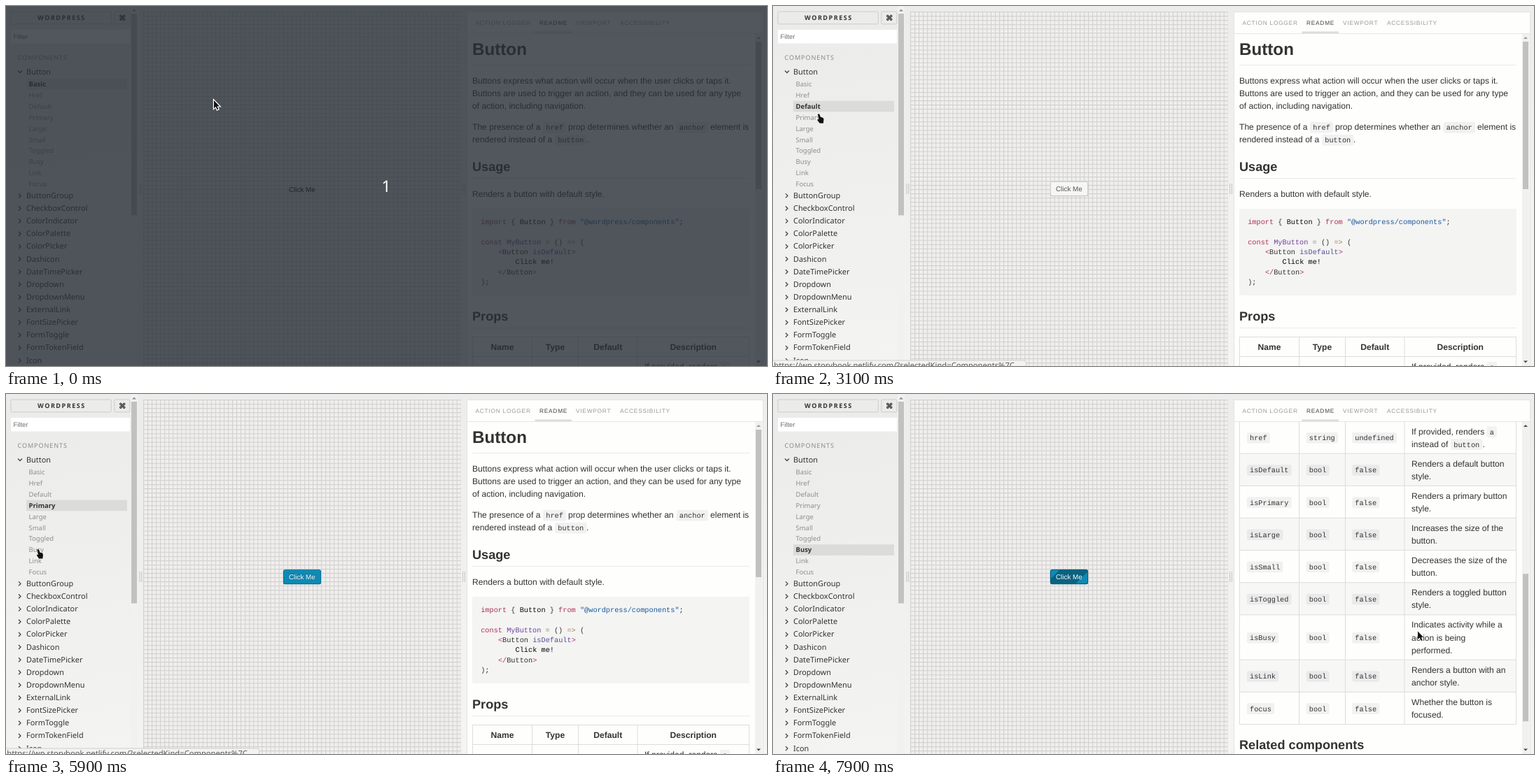
An HTML page that plays this animation: 1087 by 515 pixels, repeating every 8000 ms.

```html
<!DOCTYPE html>
<html lang="en">
<head>
<meta charset="utf-8">
<title>Component storybook</title>
<style>
html, body { margin: 0; width: 100%; height: 100%; overflow: hidden; background: #eeeeed; }
svg { display: block; width: 1087px; height: 515px; }
text { white-space: pre; text-rendering: geometricPrecision; }
.ui { font-family: "Noto Sans", "Open Sans", sans-serif; }
.sans { font-family: "Liberation Sans", Arial, sans-serif; }
.mono { font-family: "Liberation Mono", monospace; }
</style>
</head>
<body>
<svg id="stage" viewBox="0 0 1087 515">
  <defs>
    <linearGradient id="page" x2=".35" y2="1">
      <stop stop-color="#ebebea"/><stop offset="1" stop-color="#f4f4f3"/>
    </linearGradient>
    <pattern id="grid" x="196" y="8" width="6.05" height="6.05" patternUnits="userSpaceOnUse">
      <path d="M0 .5H6.05M.5 0V6.05" stroke="#000" stroke-opacity=".13"/>
    </pattern>
    <clipPath id="readmeClip"><rect x="659" y="40" width="411" height="475"/></clipPath>
    <clipPath id="buttonClip"><rect x="396.5" y="251.5" width="53" height="20" rx="2"/></clipPath>
  </defs>
</svg>
<script>
const LOOP = 8000, STEP = 100;
const stage = document.getElementById('stage');
const INK = '#333';

function add(parent, tag, attrs = {}, text) {
  const el = document.createElementNS('http://www.w3.org/2000/svg', tag);
  for (const k in attrs) el.setAttribute(k, attrs[k]);
  if (text !== undefined) el.textContent = text;
  parent.append(el);
  return el;
}
const group = (parent, attrs) => add(parent, 'g', attrs);
const rect = (parent, x, y, width, height, fill, more) =>
  add(parent, 'rect', { x, y, width, height, fill, ...more });
const line = (parent, d, stroke, more) =>
  add(parent, 'path', { d, stroke, fill: 'none', ...more });
const label = (parent, cls, size, x, y, str, fill = INK, more) =>
  add(parent, 'text', { class: cls, 'font-size': size, x, y, fill, ...more }, str);
const show = (el, on) => el.setAttribute('visibility', on ? 'visible' : 'hidden');
const bold = { 'font-weight': 700 };

// Sidebar
rect(stage, 0, 0, 1087, 515, 'url(#page)');
const side = group(stage);
const frame = { stroke: '#c4c4c3', 'stroke-width': 0.8, rx: 1.5 };
rect(side, 6.9, 8, 143.4, 17.8, 'none', frame);
rect(side, 154.9, 8, 22, 17.8, 'none', frame);
label(side, 'ui', 9.07, 45, 20.3, 'WORDPRESS', INK, { ...bold, 'letter-spacing': 1.5 });
label(side, 'ui', 10.5, 166, 20.8, '⌘', INK, { ...bold, 'text-anchor': 'middle' });
rect(side, 7, 34, 170, 19.5, '#fff');
label(side, 'sans', 9.4, 10.5, 47, 'Filter', '#6d6d6d');
label(side, 'ui', 9.1, 16.5, 77, 'COMPONENTS', '#8c8c8c', { 'letter-spacing': 0.9 });

line(side, 'M17 92.5l3 3 3-3', '#444', { 'stroke-width': 1.3 });
label(side, 'ui', 10.9, 29, 97.6, 'Button');
const marker = rect(side, 29, 104, 144, 15.6, '#dbdbda');
const stories = 'Basic Href Default Primary Large Small Toggled Busy Link Focus'.split(' ')
  .map((name, i) => label(side, 'ui', 9.5, 32.5, 115.1 + i * 15.89, name));
('ButtonGroup CheckboxControl ColorIndicator ColorPalette ColorPicker Dashicon DateTimePicker ' +
 'Dropdown DropdownMenu ExternalLink FontSizePicker FormToggle FormTokenField Icon')
  .split(' ').forEach((name, i) => {
    const y = 271 + i * 18.13;
    line(side, `M18 ${y - 2.6}l3 3-3 3`, '#444', { 'stroke-width': 1.3 });
    label(side, 'ui', 10.9, 29, y + 3.9, name);
  });
rect(side, 178, 0, 10, 515, '#f1f1f0');
rect(side, 179, 11, 8, 288.5, '#c1c1c1');
add(side, 'path', { d: 'M180 7.5l3-3 3 3z', fill: '#8a8a8a' });

// Preview
rect(stage, 196, 8, 454, 507, '#f0efee');
rect(stage, 196, 8, 454, 507, 'url(#grid)');
line(stage, 'M191 254v15M193.8 254v15M652.6 254v15M655.4 254v15', '#c4c4c4');

function clickMe(parent, y, fill, more) {
  label(parent, 'sans', 9.83, 404, y, 'Click Me', fill, more);
}
const BLUE = '#0f8ab3', NAVY = '#005f87', BUSY = '#0b627f';
function buttonBox(parent, fill, edge, shade) {
  rect(parent, 396, 252, 54, 20.3, shade, { rx: 2.5 });
  rect(parent, 396.4, 251.4, 53.2, 20, fill, { stroke: edge, 'stroke-width': 0.8, rx: 2.3 });
}
const buttons = {};
buttons.basic = group(stage);
clickMe(buttons.basic, 265.6, '#000');
buttons.plain = group(stage);
buttonBox(buttons.plain, '#f6f6f5', '#c9c9c9', '#bdbdbd');
clickMe(buttons.plain, 265, '#555');
buttons.primary = group(stage);
buttonBox(buttons.primary, BLUE, '#08709a', NAVY);
clickMe(buttons.primary, 265, '#fff', { style: 'text-shadow:0 -1px 1px ' + NAVY });

// Slanted dark bands that slide left through the busy button
const TILE = 75.6, BAND_SPEED = 0.0605;
buttons.busy = group(stage);
buttonBox(buttons.busy, BLUE, NAVY, NAVY);
const bands = group(group(buttons.busy, { 'clip-path': 'url(#buttonClip)' }));
for (const x of [-TILE, 0])
  add(bands, 'path', { d: `M${x + 27} 251h42.5l-21 21h-42.5z`, fill: BUSY });
rect(buttons.busy, 396.4, 251.4, 53.2, 20, 'none', { stroke: NAVY, 'stroke-width': 0.8, rx: 2.3 });
clickMe(buttons.busy, 265, '#fff', { style: 'text-shadow:0 -1px 1px ' + NAVY });

// Readme panel
rect(stage, 658.5, 8.5, 423, 520, '#fefefd', { stroke: '#e3e3e2' });
line(stage, 'M659 39.5H1081', '#e6e6e5');
rect(stage, 755.5, 36.5, 52.5, 2.5, '#dcdcdb');
[['ACTION LOGGER', 670.5], ['README', 762], ['VIEWPORT', 814], ['ACCESSIBILITY', 877]].forEach(([name, x], i) =>
  label(stage, 'sans', 8.32, x, 26.5, name, i === 1 ? '#444' : '#999', { 'letter-spacing': 0.76 }));

const panel = group(stage);
const doc = group(group(panel, { 'clip-path': 'url(#readmeClip)' }));
const CODE = 10.28, CHAR = 6.17, BODY = 12.1;

const para = (x, y, str, more) => label(doc, 'sans', BODY, x, y, str, INK, more);
function chip(x, y, str) {
  rect(doc, x - 4.1, y - 11.3, str.length * CHAR + 8.2, 15.6, '#1b1f23', { 'fill-opacity': 0.055, rx: 2.3 });
  label(doc, 'mono', CODE, x, y, str);
}
function heading(y, str, size = 18.15, rule = y + 10.5) {
  label(doc, 'sans', size, 666, y, str, INK, bold);
  line(doc, `M666 ${rule}H1062`, '#e8eaec');
}

heading(70.3, 'Button', 24.2, 84.5);
para(666, 110.6, 'Buttons express what action will occur when the user clicks or taps it.');
para(666, 128.7, 'Buttons are used to trigger an action, and they can be used for any type');
para(666, 146.9, 'of action, including navigation.');
para(666, 177.2, 'The presence of a');
chip(771.3, 177.2, 'href');
para(803, 177.2, 'prop determines whether an');
chip(961.8, 177.2, 'anchor');
para(1006, 177.2, 'element is');
para(666, 195.3, 'rendered instead of a');
chip(788.3, 195.3, 'button');
para(829, 195.3, '.');
heading(236, 'Usage');
para(666, 272.5, 'Renders a button with default style.');

// Code sample: rows of [row, indent, colour, text, colour, text, ...]
const KEY = '#b0325f', STR = '#1a5aa0', FN = '#6f42a0', OP = '#a67f59', ATTR = '#5b4f96', TXT = '#111', PUN = '#333';
rect(doc, 666, 290, 396, 124, '#f4f4f3', { rx: 2.3 });
[
  [0, 0, KEY, 'import', PUN, ' { ', TXT, 'Button', PUN, ' } ', KEY, 'from ', STR, '"@wordpress/components"', PUN, ';'],
  [2, 0, KEY, 'const ', FN, 'MyButton ', OP, '= ', PUN, '() ', OP, '=>', PUN, ' ('],
  [3, 4, KEY, '<', PUN, 'Button ', ATTR, 'isDefault', KEY, '>'],
  [4, 8, '#000', 'Click me!'],
  [5, 4, KEY, '</', PUN, 'Button', KEY, '>'],
  [6, 0, PUN, ');'],
].forEach(([row, indent, ...parts]) => {
  const t = label(doc, 'mono', CODE, 678.2 + indent * CHAR, 311.8 + row * 14.42, '');
  for (let i = 0; i < parts.length; i += 2) add(t, 'tspan', { fill: parts[i] }, parts[i + 1]);
});

// Props table
heading(450.1, 'Props');
const cols = [666.5, 751.5, 817.5, 902, 1061.5], TOP = 473.5, LH = 18.15;
['Name', 'Type', 'Default', 'Description'].forEach((name, i) =>
  para((cols[i] + cols[i + 1]) / 2, 492.2, name, { ...bold, 'text-anchor': 'middle' }));
let rowY = 501.5;
const rules = [TOP, rowY];
[
  ['href', 'If provided, renders', 'instead of'],
  ['isDefault', 'Renders a default button', 'style.'],
  ['isPrimary', 'Renders a primary button', 'style.'],
  ['isLarge', 'Increases the size of the', 'button.'],
  ['isSmall', 'Decreases the size of the', 'button.'],
  ['isToggled', 'Renders a toggled button', 'style.'],
  ['isBusy', 'Indicates activity while a', 'action is being', 'performed.'],
  ['isLink', 'Renders a button with an', 'anchor style.'],
  ['focus', 'Whether the button is', 'focused.'],
].forEach(([name, ...desc], i) => {
  const h = desc.length * LH + 9.85, base = rowY + h / 2 + 4.5;
  const lineY = k => base + (k - (desc.length - 1) / 2) * LH;
  if (i % 2) rect(doc, 666.5, rowY, 395, h, '#f7f7f6');
  chip(681, base - 0.3, name);
  chip(765.8, base - 0.3, i ? 'bool' : 'string');
  chip(831.3, base - 0.3, i ? 'false' : 'undefined');
  desc.forEach((s, k) => para(912, lineY(k), s));
  if (!i) {
    chip(1023.8, lineY(0), 'a');
    chip(972.3, lineY(1), 'button');
    para(1013.5, lineY(1), '.');
  }
  rules.push(rowY += h);
});
line(doc, rules.map(y => `M666 ${y}H1062`).join('') + cols.map(x => `M${x} ${TOP}V${rowY}`).join(''), '#dcdddd');
heading(970.9, 'Related components');

rect(panel, 1070, 40, 10.5, 475, '#f1f1f0');
const thumb = rect(panel, 1071, 51, 8, 211, '#c1c1c1');
const upArrow = add(panel, 'path', { d: 'M1072 47l3-3 3 3z' });
add(panel, 'path', { d: 'M1072 507.5l3 3 3-3z', fill: '#444' });

// Link status bubble
const bubble = group(stage);
add(bubble, 'path', { d: 'M-1 516V507H358.5q3 0 3 3V516z', fill: '#f3f3f2', stroke: '#cfcfce' });
label(bubble, 'ui', 11.2, 1.3, 518.2, 'https://wp.storybook.netlify.com/?selectedKind=Components%7C', '#5a5a5a');

// Countdown veil
const veil = group(stage);
rect(veil, 0, 0, 1087, 515, '#262d35', { 'fill-opacity': 0.8 });
label(veil, 'ui', 23, 543, 265.6, '1', '#fff', { 'text-anchor': 'middle' });

// Pointer
const pointer = group(stage);
const arrow = add(pointer, 'path', {
  d: 'M0 0V11.4l2.6-2.3 2 4.2 1.8-.9-2-4h3.6z', fill: '#111', stroke: '#fff', 'paint-order': 'stroke',
});
const hand = add(pointer, 'path', {
  d: 'M-.6 1Q.6-.8 2 .8L3.4 4.6 6.6 5.6Q8 6.2 8 8L7.4 13.6H2.2L-.8 9.6Q-1.8 8-.2 7.6L1 8.2z',
  fill: '#111', stroke: '#fff', 'stroke-width': 0.9, 'paint-order': 'stroke',
});

const path = [
  [0, 297, 135], [200, 297, 135], [300, 276, 133.5], [600, 417, 262], [1000, 417, 262],
  [1900, 57, 143], [2800, 57, 143], [2900, 57, 143.5], [3000, 57, 143.5], [3200, 72, 165],
  [3400, 54, 186], [3600, 54, 186], [3700, 47, 201], [3800, 47, 201], [4100, 45, 209],
  [4500, 50, 166], [5300, 50, 166], [5600, 48, 227], [5700, 48, 227], [5900, 45, 222],
  [6600, 45, 222], [7100, 921, 339.5], [8000, 921, 339.5],
];
const scroll = [[0, 0], [7100, 0], [7500, 292.5], [7900, 462.5], [8000, 462.5]];

function at(keys, t) {
  const i = Math.max(1, keys.findIndex(k => k[0] >= t));
  const a = keys[i - 1], b = keys[i], f = (t - a[0]) / (b[0] - a[0]);
  return a.slice(1).map((v, k) => v + (b[k + 1] - v) * f);
}

function draw(now) {
  const t = Math.floor((now % LOOP) / STEP) * STEP;
  const current = t < 2400 ? 0 : t < 4900 ? 2 : t < 6300 ? 3 : 7;
  const loading = (t >= 2400 && t < 2600) || (t >= 4900 && t < 5000);

  marker.setAttribute('y', 104 + current * 15.89);
  stories.forEach((el, i) => {
    el.setAttribute('font-weight', i === current ? 700 : 400);
    el.setAttribute('fill', i === current ? INK : '#8e8e8e');
  });

  const kind = { 0: 'basic', 2: 'plain', 3: 'primary', 7: 'busy' }[current];
  for (const k in buttons) show(buttons[k], k === kind && !loading);
  bands.setAttribute('transform', `translate(${383 + ((LOOP - STEP - t) * BAND_SPEED) % TILE})`);

  const [top] = at(scroll, t);
  show(panel, !loading);
  doc.setAttribute('transform', `translate(0 ${-top})`);
  thumb.setAttribute('y', 51 + top * 0.446);
  upArrow.setAttribute('fill', top ? '#444' : '#9a9a9a');

  bubble.setAttribute('opacity', t < 1900 || t >= 7200 ? 0 : t < 2100 ? 0.5 : 1);
  show(veil, t < 300);

  const [x, y] = at(path, t);
  const onButton = x > 396 && x < 450 && y > 250 && y < 272;
  pointer.setAttribute('transform', `translate(${x} ${y})`);
  show(hand, x < 175 || onButton);
  show(arrow, x >= 175 && !onButton);
  arrow.setAttribute('stroke-width', t < 300 ? 2.4 : 0.6);
}

let start;
function tick(now) {
  start ??= now;
  draw(now - start);
  requestAnimationFrame(tick);
}
draw(0);
requestAnimationFrame(tick);
</script>
</body>
</html>
```
